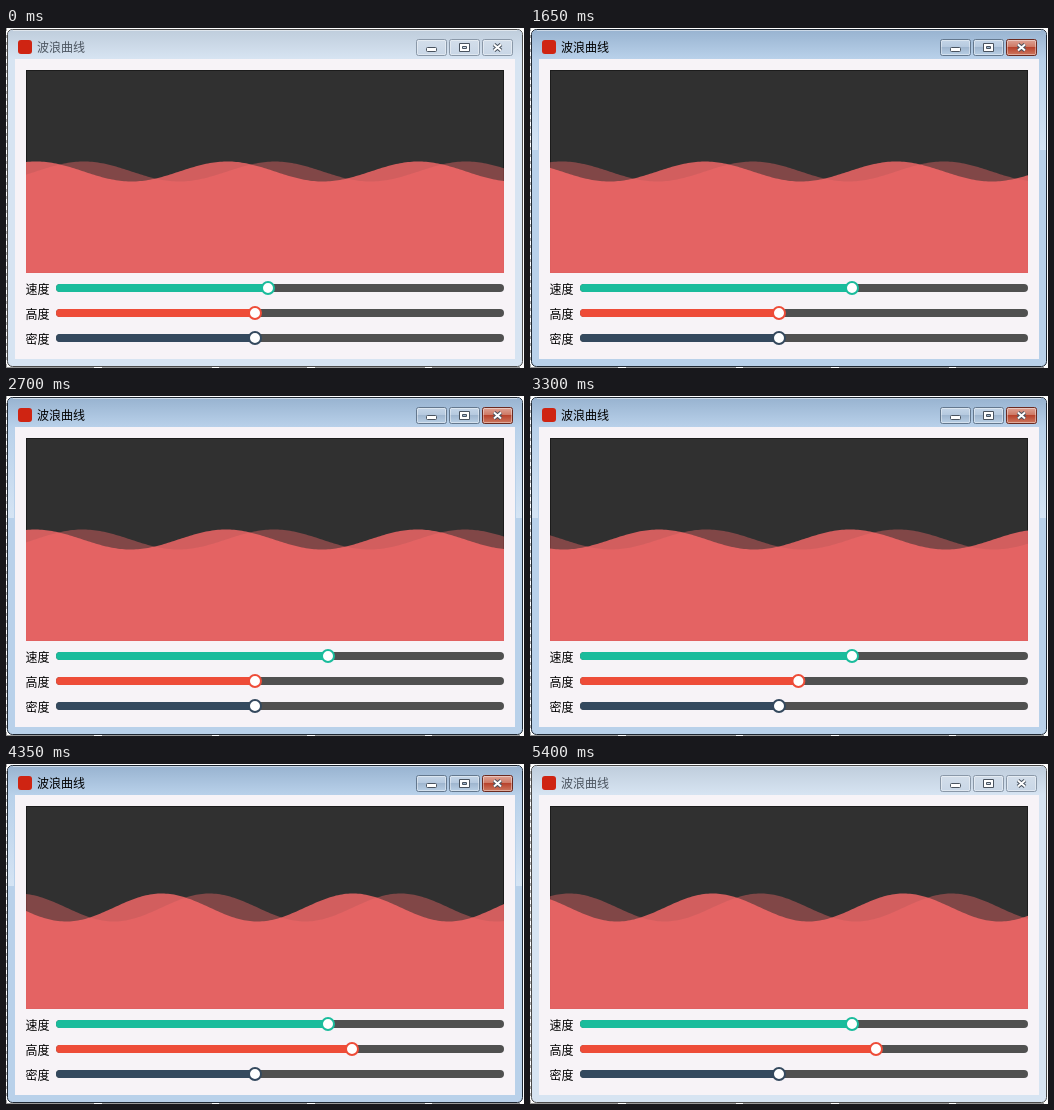
Write an HTML page that moves like this. It is 518 by 340 pixels and loops after 5550 ms.

```html
<!DOCTYPE html>
<html lang="zh">
<head>
<meta charset="utf-8">
<style>
html, body { margin: 0; width: 100%; height: 100%; overflow: hidden; background: #fff; }
svg { display: block; }
text { font: 12px "Noto Sans CJK SC", "Noto Sans CJK", sans-serif; fill: #000; }
.idle .on, svg:not(.idle) .off { display: none; }
.idle #title { fill: #4c5560; }
.glyph { fill: #fff; stroke: #49535f; }
</style>
</head>
<body>
<svg id="stage" width="518" height="340" viewBox="0 0 518 340">
  <defs>
    <linearGradient id="barOn" x2="0" y2="1"><stop stop-color="#98b3d0"/><stop offset="1" stop-color="#b9d1ea"/></linearGradient>
    <linearGradient id="barOff" x2="0" y2="1"><stop stop-color="#bfcddc"/><stop offset="1" stop-color="#d7e4f2"/></linearGradient>
    <linearGradient id="side" x2="0" y2="1"><stop stop-color="#b9d1ea"/><stop offset="1" stop-color="#d5e4f4"/></linearGradient>
    <linearGradient id="btnOn" x2="0" y2="1"><stop stop-color="#c5d6e8"/><stop offset=".5" stop-color="#b4c8de"/><stop offset=".5" stop-color="#9fb6cf"/><stop offset="1" stop-color="#bad0e6"/></linearGradient>
    <linearGradient id="btnOff" x2="0" y2="1"><stop stop-color="#d3deea"/><stop offset="1" stop-color="#c8d6e6"/></linearGradient>
    <linearGradient id="close" x2="0" y2="1"><stop stop-color="#dfa598"/><stop offset=".5" stop-color="#cc7560"/><stop offset=".5" stop-color="#b8432d"/><stop offset="1" stop-color="#cf7b62"/></linearGradient>
  </defs>
  <path d="M0 339.5H518" stroke="#999" stroke-dasharray="88 8 110 7"/>
  <path d="M.5 0V340" stroke="#aaa" stroke-dasharray="3 4"/>
  <g class="on">
    <rect x="1.5" y="1.5" width="515" height="337" rx="5" fill="#b9d1ea" stroke="#1e2833"/>
    <path d="M2 31V7q0-5 5-5H511q5 0 5 5V31z" fill="url(#barOn)"/>
    <path d="M2 31h6v91h-6zM510 31h6v91h-6z" fill="url(#side)"/>
  </g>
  <g class="off">
    <rect x="1.5" y="1.5" width="515" height="337" rx="5" fill="#d7e4f2" stroke="#4a4a4a"/>
    <path d="M2 31V7q0-5 5-5H511q5 0 5 5V31z" fill="url(#barOff)"/>
  </g>
  <path d="M7 2.5H511" stroke="#fff" opacity=".5"/>
  <rect x="9" y="31" width="500" height="300" fill="#f7f3f7"/>
  <rect x="12" y="12" width="14" height="14" rx="3" fill="#cf2412"/>
  <text id="title" x="31" y="24">波浪曲线</text>
  <g id="buttons"></g>
  <rect x="20" y="42" width="478" height="203" fill="#303030"/>
  <rect x="20.5" y="42.5" width="477" height="202" fill="none" stroke="#1c1c1c"/>
  <path id="back" fill="#ff6b6b" fill-opacity=".392"/>
  <path id="front" fill="#ff6b6b" fill-opacity=".784"/>
  <g id="sliders"></g>
</svg>
<script>
const $ = id => document.getElementById(id);
const STEP = 150, FRAMES = 37;
const LEFT = 20, RIGHT = 498, BOTTOM = 245, MID = 143.5;
const TRACK = 50, SPAN = RIGHT - TRACK;
const W = 5 * Math.PI / (RIGHT - LEFT);
// timer ticks elapsed at certain steps; each tick shifts the wave by 0.6 rad
const TICKS = [[0, 0], [6, 10], [11, 13], [18, 21], [26, 31], [32, 38], [36, 44]];

$('buttons').innerHTML = [410, 443, 476].map((x, i) => {
  const box = (cls, fill, line) =>
    `<rect class="${cls}" x="${x + .5}" y="11.5" width="30" height="16" rx="2" fill="url(#${fill})" stroke="${line}"/>`;
  const red = i === 2;
  return box('off', 'btnOff', '#8a98a8') +
    box('on', red ? 'close' : 'btnOn', red ? '#6b2a20' : '#64788e') +
    `<rect x="${x + 1.5}" y="12.5" width="28" height="14" rx="1" fill="none" stroke="#fff" opacity=".4"/>`;
}).join('') +
  `<rect class="glyph" x="420.5" y="19.5" width="10" height="4" rx="1"/>
   <path class="glyph" fill-rule="evenodd" d="M453.5 15.5h10v8h-10zM456.5 18.5h4v2h-4z"/>
   <path d="M488 16.5l7 6M495 16.5l-7 6" stroke="#49535f" stroke-width="4"/>
   <path d="M488 16.5l7 6M495 16.5l-7 6" stroke="#fff" stroke-width="2"/>`;

$('sliders').innerHTML = [['速度', '#1abc9c'], ['高度', '#ee4c38'], ['密度', '#34495e']].map(([name, color], i) => {
  const y = 260 + 25 * i;
  return `<text x="19.5" y="${y + 6}">${name}</text>
    <rect x="${TRACK}" y="${y - 4}" width="${SPAN}" height="8" rx="4" fill="#505050"/>
    <rect id="fill${i}" x="${TRACK}" y="${y - 4}" height="8" rx="4" fill="${color}"/>
    <circle id="knob${i}" cy="${y}" r="6" fill="#fff" stroke="${color}" stroke-width="2"/>`;
}).join('');

function setSlider(i, x) {
  $('fill' + i).setAttribute('width', x - TRACK);
  $('knob' + i).setAttribute('cx', x);
}

function ticksAt(n) {
  const i = Math.max(1, TICKS.findIndex(p => p[0] >= n));
  const [a, ta] = TICKS[i - 1], [b, tb] = TICKS[i];
  return Math.round(ta + (tb - ta) * (n - a) / (b - a));
}

function wave(crest, amp) {
  let d = `M${LEFT} ${BOTTOM}`;
  for (let x = LEFT; x <= RIGHT; x += 2)
    d += `L${x} ${(MID - amp * Math.cos(W * (x - crest))).toFixed(2)}`;
  return d + `V${BOTTOM}Z`;
}

const clamp = (v, lo, hi) => Math.min(hi, Math.max(lo, v));
let last = -1;

function draw(now) {
  const n = Math.floor(now / STEP) % FRAMES;
  if (n !== last) {
    last = n;
    $('stage').classList.toggle('idle', n === 0 || n === FRAMES - 1);
    const heightX = clamp(249 + 19.4 * (n - 21), 249, 346);
    setSlider(0, clamp(262 + 7.4 * (n - 1), 262, 322));
    setSlider(1, heightX);
    setSlider(2, 249);
    const amp = 2 * Math.round(1 + 9 * (heightX - TRACK) / SPAN);
    const crest = 30 - .6 * ticksAt(n) / W;
    $('front').setAttribute('d', wave(crest, amp));
    $('back').setAttribute('d', wave(crest + Math.PI / 2 / W, amp));
  }
  requestAnimationFrame(draw);
}
draw(0);
</script>
</body>
</html>
```
